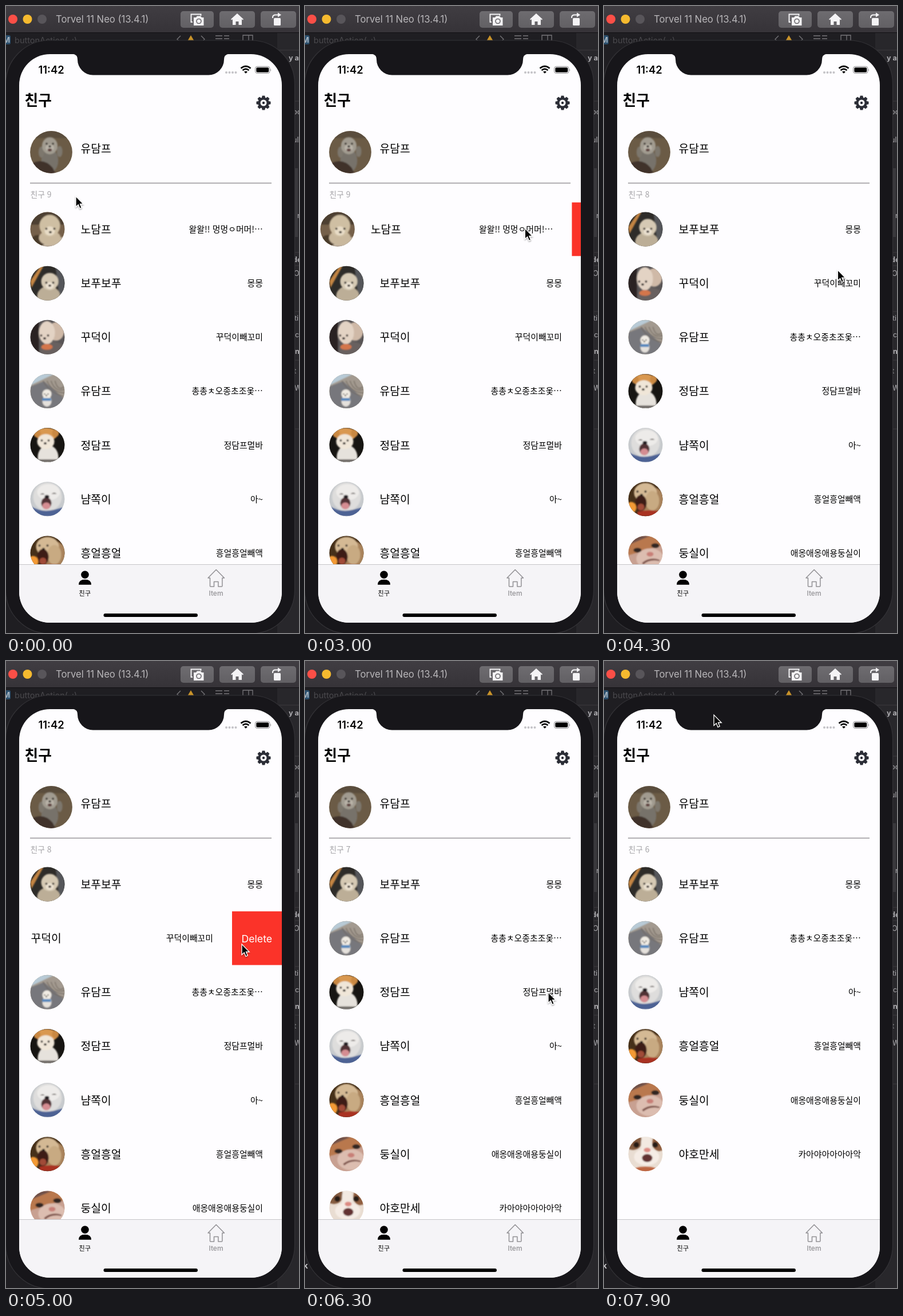
Write an HTML page that moves like this. It is 512x1094 px and loops after 8 s.

```html
<!DOCTYPE html>
<html lang="ko">
<head>
<meta charset="utf-8">
<style>
  html, body { margin: 0; width: 100%; height: 100%; overflow: hidden; background: #1f1e22; }
  #stage { display: block; width: 512px; height: 1094px; }
  text { font-family: 'Noto Sans CJK KR', 'Noto Sans CJK', sans-serif; }
  .latin { font-family: Inter, Roboto, sans-serif; }
</style>
</head>
<body>
<svg id="stage" viewBox="0 0 512 1094" xmlns="http://www.w3.org/2000/svg">
  <defs>
    <linearGradient id="bar" x2="0" y2="1"><stop stop-color="#403d42"/><stop offset="1" stop-color="#363338"/></linearGradient>
    <linearGradient id="btn" x2="0" y2="1"><stop stop-color="#6e6c70"/><stop offset="1" stop-color="#626064"/></linearGradient>
    <clipPath id="round"><circle r="30"/></clipPath>
    <clipPath id="list"><rect x="23" y="342" width="459" height="632"/></clipPath>
    <filter id="soft"><feGaussianBlur stdDeviation="1"/></filter>
    <filter id="shade" x="-50%" y="-50%" width="200%" height="200%"><feDropShadow dx="0" dy="1.5" stdDeviation="1.2" flood-opacity=".4"/></filter>
  </defs>

  <rect width="512" height="1094" fill="#1f1e22"/>
  <g id="editor"></g>

  <!-- window bar -->
  <rect width="512" height="46" fill="url(#bar)"/>
  <path d="M0 46.5H512" stroke="#121114"/>
  <circle cx="12" cy="23" r="8" fill="#fb4f47"/>
  <circle cx="37.5" cy="23" r="8" fill="#f5ba2f"/>
  <circle cx="63" cy="23" r="8" fill="#58555a"/>
  <text class="latin" x="87" y="29.3" font-size="16.650" fill="#b9b7ba">Torvel 11 Neo (13.4.1)</text>
  <g fill="url(#btn)">
    <rect x="305" y="9" width="58" height="29" rx="5"/>
    <rect x="373" y="9" width="62" height="29" rx="5"/>
    <rect x="445" y="9" width="62" height="29" rx="5"/>
  </g>
  <g fill="#f4f3f5">
    <path d="M326 28h-2.500V14.500h17V17" fill="none" stroke="#f4f3f5" stroke-width="2"/>
    <path d="M328 20h4l2-2.500h6l2 2.500h3.500v14H328z"/>
    <circle cx="337" cy="26.500" r="4" fill="none" stroke="#69676b" stroke-width="1.600"/>
    <path d="M404 13l11 10-1.300 1.500-1.700-1.400V33h-5.500v-6h-5v6H396v-9.900l-1.700 1.400L393 23z"/>
    <rect x="468" y="21" width="12" height="13" rx="1.500"/>
    <path d="M466 21v-1q0-4.500 5-4.500h5" fill="none" stroke="#f4f3f5" stroke-width="2"/>
    <path d="M475 11.500l6 4-6 4z"/>
  </g>

  <!-- device -->
  <rect x="-.5" y="60" width="505" height="1035" rx="76" fill="#17161a" stroke="#333236" stroke-width="1.200"/>
  <rect x="23" y="84" width="459" height="992" rx="54" fill="#fefdff"/>
  <path d="M116 83.500q9 1 9 10a27 27 0 0 0 27 27H354a27 27 0 0 0 27-27q0-9 9-10z" fill="#17161a"/>

  <text class="latin" x="56.500" y="118" font-size="18.400" font-weight="600">11:42</text>
  <g fill="#c4c3c7"><circle cx="385" cy="116" r="2"/><circle cx="390.500" cy="116" r="2"/><circle cx="396" cy="116" r="2"/><circle cx="401.500" cy="116" r="2"/></g>
  <g fill="none" stroke="#000" stroke-width="2.700">
    <path d="M410.500 108.800q8.500-7.200 17 0M413.500 112.200q5.500-4.500 11 0"/>
    <path d="M416 114.800q3-2.200 6 0l-3 3z" fill="#000" stroke="none"/>
  </g>
  <rect x="435.500" y="105.500" width="25.500" height="12" rx="3.600" fill="none" stroke="#8b8a8d"/>
  <rect x="437.300" y="107.300" width="21.900" height="8.400" rx="2"/>
  <path d="M462.300 109.500q1.700 2 0 4z" fill="#8b8a8d"/>

  <text x="32.600" y="173.500" font-size="25.700" font-weight="700">친구</text>
  <g id="gear" transform="translate(450 169)" fill="#2b2d36"></g>
  <g id="me"></g>
  <text x="130.500" y="256" font-size="19.300">유담프</text>
  <path d="M42 309H464" stroke="#98979a" stroke-width="1.300"/>
  <text id="count" x="42.500" y="333.500" font-size="13.800" fill="#a4a3a7"></text>
  <g id="rows" clip-path="url(#list)"></g>

  <!-- tab bar -->
  <path d="M23 974H482V1022a54 54 0 0 1-54 54H77a54 54 0 0 1-54-54z" fill="#f5f4f7"/>
  <path d="M23 974.500H482" stroke="#c6c5c9"/>
  <ellipse cx="138" cy="992.300" rx="6.800" ry="6.700"/>
  <path d="M127 1009.800q0-9 11-9t11 9z"/>
  <text x="137.700" y="1029" font-size="11.400" text-anchor="middle">친구</text>
  <path d="M353 998l14.200-14.500 14.300 14.500h-3.600v14q0 1-1 1h-6v-8.500h-7.400v8.500h-6q-1 0-1-1V998z" fill="none" stroke="#929195" stroke-width="1.500" stroke-linejoin="round"/>
  <text class="latin" x="367" y="1029" font-size="12" font-weight="500" text-anchor="middle" fill="#929195">Item</text>
  <rect x="170.500" y="1060" width="164.500" height="6" rx="3"/>

  <g id="cursor"><path d="M0 0V18.500L4.300 14.600 7 21.300 10.200 20 7.400 13.500H13.200Z" stroke="#fff" stroke-width="1.300" filter="url(#shade)"/></g>
</svg>

<script>
const LOOP = 8000, STEP = 100;
const ROW = 94.13, TOP = 342.4, LEFT = 23, WIDTH = 459;
const COLLAPSE = 350;
const $ = id => document.getElementById(id);

const oval = (x, y, rx, ry, fill) => `<ellipse cx="${x}" cy="${y}" rx="${rx}" ry="${ry}" fill="${fill}"/>`;
const shape = (d, fill) => `<path d="${d}" fill="${fill}"/>`;
const dots = (x, y, gap, r = 1.9) =>
  oval(x - gap, y, r, r, '#211c1a') + oval(x + gap, y, r, r, '#211c1a') + oval(x, y + gap * .85, r * 1.3, r, '#1b1716');
const avatar = (x, y, bg, art, scale = 1) =>
  `<g transform="translate(${x} ${y}) scale(${scale})"><g clip-path="url(#round)">
    <rect x="-31" y="-31" width="62" height="62" fill="${bg}"/><g filter="url(#soft)">${art}</g></g></g>`;

const friends = [
  ['노담프', '왈왈!! 멍멍ㅇ머머!…', '#75604a',
    shape('M-30-30H30V-8H-30z', '#4e4031') + shape('M-30 14H30V30H-30z', '#c3b6a4') + oval(-16, 20, 13, 10, '#4a3a2c') +
    oval(4, 15, 19, 13, '#c9b89d') + oval(4, -6, 18, 19, '#cfbfa3') + oval(4, 3, 9, 8, '#e8dcc6') + dots(5, -1, 7)],
  ['보푸보푸', '몽몽', '#2e2c29',
    shape('M-30-4L-12-30h5L-28 8z', '#c38443') + shape('M14-30H30V20H20z', '#54565a') +
    oval(2, 22, 20, 17, '#bcae97') + oval(4, -3, 15, 15, '#d5c9b4') + oval(4, 4, 7, 6, '#ece2d2') + dots(4, -1, 6)],
  ['꾸덕이', '꾸덕이빼꼬미', '#595556',
    shape('M-30-30H-15V30H-30z', '#2a2220') + oval(9, 22, 22, 14, '#67605e') + oval(15, -10, 14, 16, '#cfb9a7') +
    oval(-1, -8, 14, 20, '#e3d3c4') + dots(-5, -3, 6) + oval(-1, 17, 10, 5, '#d4764b')],
  ['유담프', '총총ㅊ오종초조옻…', '#a39a90',
    shape('M-30-30H12L-30-10z', '#b8cad6') + shape('M-30-8L-6-17 30 14V30H-30z', '#77777b') +
    [0, 1, 2, 3].map(i => `<path d="M${-8 + i * 7}-18Q${4 + i * 5} 4 32 ${10 - i * 7}" fill="none" stroke="#71685f" stroke-width="1.2"/>`).join('') +
    oval(-1, 17, 8, 10, '#e5e1dc') + oval(-1, 5, 8, 8, '#f1ece4') + dots(-2, 5, 3, 1.1) + shape('M-9 12H6V17H-9z', '#5688bd')],
  ['정담프', '정담프멀바', '#171512',
    oval(1, 21, 18, 21, '#e6e2dc') + oval(-2, -19, 20, 11, '#d99850') + oval(-18, -20, 6, 7, '#c98843') +
    oval(14, -21, 6, 7, '#c98843') + oval(-3, -6, 15, 13, '#f0e6d8') + dots(-4, -8, 6) + shape('M-30 25H30V30H-30z', '#6d6965')],
  ['냠쪽이', '아~', '#c7cacd',
    oval(0, -4, 25, 25, '#dedddc') + oval(2, -12, 20, 14, '#edebe9') + shape('M-30 12Q-12 24 10 19T30 13V30H-30z', '#4e6294') +
    shape('M-13-8q5-4 8 0M7-9q5-4 9 0', '#5d5553') + oval(-2, 7, 9, 10, '#513034') + oval(-2, 12, 7, 6, '#d58d92') + oval(-1, -4, 4, 3, '#241f20')],
  ['흥얼흥얼', '흥얼흥얼빼액', '#463019',
    oval(10, 3, 24, 24, '#a9835c') + oval(0, -11, 20, 17, '#d4b994') + oval(12, 3, 12, 17, '#c8aa82') +
    oval(-8, 7, 10, 14, '#3d1d15') + oval(-8, 14, 6, 6, '#a04b39') + dots(-7, -13, 7) + oval(-25, 15, 9, 10, '#f39a35') +
    shape('M-14 22Q8 17 30 22V30H-14z', '#a93120')],
  ['둥실이', '애옹애옹애용둥실이', '#c8a091',
    shape('M-30-30H30V-14Q0-6-30 4z', '#b9784d') + shape('M-30-30H8L-30-14z', '#70514a') + oval(8, 10, 24, 18, '#dcbdb0') +
    oval(-14, -5, 7, 4, '#302622') + oval(17, -13, 7, 4, '#302622') + oval(8, 2, 6, 4, '#c87f77') +
    shape('M-6 17Q8 6 25 12L24 14Q8 10-4 20z', '#7c5148')],
  ['야호만세', '카아야아아아아악', '#e9ddd2',
    oval(-22, -22, 16, 15, '#855b40') + oval(24, -20, 12, 15, '#915f40') + oval(1, -16, 9, 22, '#f2e9e1') +
    oval(-16, -16, 5, 5, '#251a17') + oval(17, -16, 5, 5, '#251a17') + oval(2, 5, 22, 15, '#f5ece5') +
    oval(3, -7, 6, 4, '#dc8b83') + oval(3, 7, 9, 7, '#633333') + oval(0, 30, 23, 8, '#bd6642')],
];

// row: [time, reveal] while dragging, then the tap that removes it
const swipes = {
  0: { drag: [[2900, 0], [3300, 100], [3500, 87]], tap: 3725 },
  2: { drag: [[4550, 0], [4800, 92], [4950, 87]], tap: 5400 },
  4: { drag: [[6450, 0], [6750, 95], [7000, 91]], tap: 7000 },
};

const pointer = [
  [0, 122, 332], [1800, 121, 332], [2700, 400, 385], [2900, 400, 388], [3300, 300, 388],
  [3650, 437, 376], [3900, 437, 374], [4450, 402, 480], [4550, 402, 480], [4800, 310, 482],
  [5000, 412, 494], [5400, 412, 494], [5700, 420, 556], [6300, 425, 578], [6450, 425, 578],
  [6750, 330, 580], [7000, 428, 579], [7100, 428, 579], [7900, 192, 94],
];

const clamp = v => Math.max(0, Math.min(1, v));
const smooth = p => p * p * (3 - 2 * p);
const easeOut = p => 1 - (1 - p) ** 2;

function sample(track, t) {
  if (t <= track[0][0]) return track[0].slice(1);
  const i = track.findIndex(k => k[0] > t);
  if (i < 0) return track[track.length - 1].slice(1);
  const a = track[i - 1], b = track[i];
  const p = smooth((t - a[0]) / (b[0] - a[0]));
  return a.slice(1).map((v, n) => v + (b[n + 1] - v) * p);
}

function buildEditor() {
  const scraps = [['y a', 494, 95], ['po', 501, 189], ['ul', 501, 238], ['n', 509, 370], ['de', 501, 447], ['O', 503, 471],
    ['ti', 504, 549], ['c', 505, 578], ['n', 505, 607], ['t', 503, 641], ['W', 504, 671]];
  const lines = [77, 166, 430, 453, 533, 618, 738];
  $('editor').innerHTML =
    `<rect x="474" y="46" width="38" height="1048" fill="#28272b"/>
     <rect x="502" y="283" width="8" height="120" fill="#3a393d"/>
     <path d="${lines.map(y => `M474 ${y}H512`).join('')}" stroke="#3c3b3f"/>
     <rect x="-8" y="51" width="16" height="16" rx="3" fill="#294e6c"/>
     <text class="latin" x="-5" y="64" font-size="13" font-weight="700" fill="#a3b3c0">M</text>
     <text class="latin" x="15" y="64.500" font-size="14.500" fill="#4a494d">buttonAction(_:)</text>
     <g fill="none" stroke="#77767a" stroke-width="1.300">
       <path d="M305 52l-6 6 6 6M341 52l6 6-6 6M366 52h12M366 57h12M366 62h12M381 52h9M381 57h9M414 51h17v14h-17zM424 51v14"/>
     </g>
     <path d="M323 51l7 12h-14z" fill="#c99329"/>
     <g id="scrap"><text class="latin" x="-3" y="1060" font-size="14" font-weight="700" fill="#c7c6c9">k</text></g>` +
    scraps.map(([s, x, y], i) =>
      `<text class="latin" x="${x}" y="${y}" font-size="12.500" font-weight="${i % 4 ? 400 : 700}" fill="#aeadb1">${s}</text>`).join('');
}

function buildGear() {
  const teeth = Array.from({ length: 8 }, (_, i) =>
    `<path d="M-3.300-8L-2.300-12.500H2.300L3.300-8z" transform="rotate(${i * 45})"/>`).join('');
  $('gear').innerHTML = teeth + '<circle r="7.500" fill="none" stroke="#2b2d36" stroke-width="4"/><circle r="2.200"/>';
}

function buildRows() {
  $('rows').innerHTML = friends.map(([name, note, bg, art]) =>
    `<svg x="${LEFT}" width="${WIDTH}" height="${ROW}" overflow="hidden">
      <g class="cell">
        ${avatar(49.5, 47.2, bg, art)}
        <text x="107.500" y="54.700" font-size="19.300">${name}</text>
        <text x="426" y="52.700" font-size="14.900" text-anchor="end">${note}</text></g>
      <g class="action"><rect width="${WIDTH}" height="${ROW}" fill="#fb3329"/>
        <text class="latin" x="16.500" y="54" font-size="17.700" fill="#fff">Delete</text></g>
    </svg>`).join('');
  return [...$('rows').children].map(box => ({
    box,
    cell: box.querySelector('.cell'),
    action: box.querySelector('.action'),
  }));
}

buildEditor();
buildGear();
$('me').innerHTML = avatar(79, 255, '#6b5b46',
  shape('M-30-30H30V-20H-30z', '#5a4e3d') + oval(-2, 12, 12, 17, '#77726a') + oval(-14, 0, 4, 8, '#7d776d') + oval(12, -1, 4, 8, '#7d776d') +
  oval(-2, -9, 11, 12, '#a19b90') + oval(-2, -6, 6, 5, '#b9b3a8') + dots(-2, -12, 4.5, 1.4) + oval(-2, -3, 3, 2, '#5b3e3a') +
  shape('M-30 18Q-12 6 2 22L6 30H-30z', '#40332a'), 1.23);
const rows = buildRows();

function render(t) {
  let y = TOP, count = rows.length;
  rows.forEach((row, i) => {
    const swipe = swipes[i];
    let shift = 0, gone = 0;
    if (swipe) {
      shift = sample(swipe.drag, t)[0];
      gone = easeOut(clamp((t - swipe.tap) / COLLAPSE));
      shift += (WIDTH - shift) * gone;
      if (t > swipe.tap) count--;
    }
    const height = ROW * (1 - gone);
    row.box.style.display = height > 0 ? '' : 'none';
    row.box.setAttribute('y', y);
    row.box.setAttribute('height', height);
    row.cell.setAttribute('transform', `translate(${-shift} 0)`);
    row.action.setAttribute('transform', `translate(${WIDTH - shift} 0)`);
    y += height;
  });
  $('count').textContent = `친구 ${count}`;
  $('scrap').style.display = t >= 5500 ? '' : 'none';
  $('cursor').setAttribute('transform', `translate(${sample(pointer, t).join(' ')})`);
}

const start = performance.now();
function tick() {
  const t = (performance.now() - start) % LOOP;
  render(Math.floor(t / STEP) * STEP);
  requestAnimationFrame(tick);
}
tick();
</script>
</body>
</html>
```
